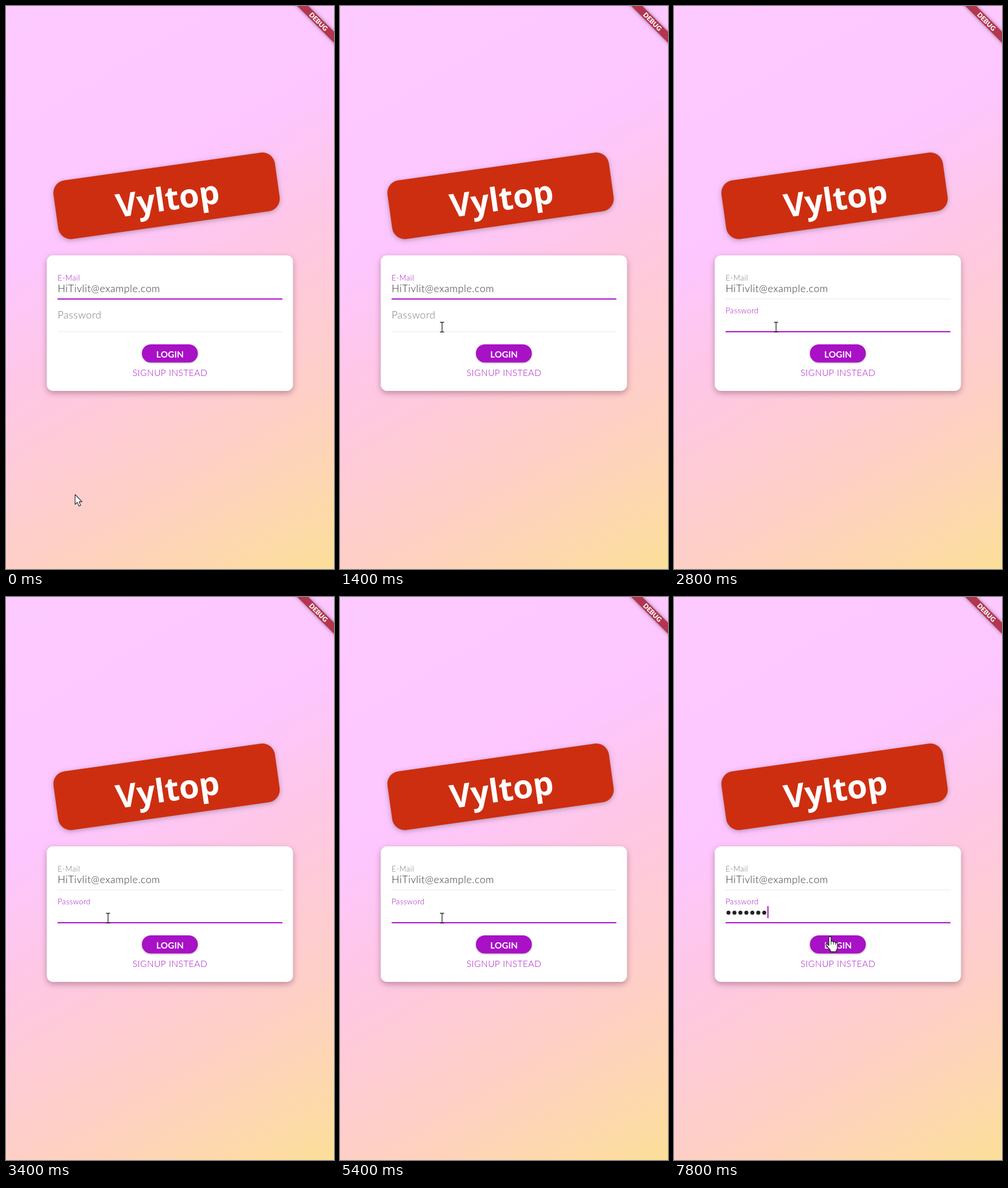
An HTML page with a canvas that plays this animation: 572 px wide and 980 px high, repeating every 8 s.

```html
<!DOCTYPE html>
<html lang="en">
<head>
<meta charset="utf-8">
<title>Login form</title>
<style>
  html, body { margin: 0; width: 100%; height: 100%; overflow: hidden; }
  canvas { display: block; width: 572px; height: 980px; }
</style>
</head>
<body>
<canvas id="stage" width="572" height="980"></canvas>
<script>
const ctx = document.getElementById('stage').getContext('2d');
const W = 572, H = 980, LOOP = 8000, STEP = 200;
const PURPLE = '#a811c5', GREY = '#777', INK = '#303030';
const EMAIL = 'HiTivlit@example.com', BRAND = 'Vyltop';
const FOCUS = 1850, BLINK = 500;
const KEYS = [5700, 5900, 6100, 6300, 6500, 6600, 6800];
// time, x, y of the pointer
const PATH = [[0, 120, 850], [800, 177, 688], [1400, 178, 559], [7000, 178, 559], [7800, 272, 592]];

function roundRect(x, y, w, h, r, fill) {
  ctx.beginPath();
  ctx.roundRect(x, y, w, h, r);
  ctx.fillStyle = fill;
  ctx.fill();
}

function withShadow(color, blur, dy, draw) {
  ctx.save();
  ctx.shadowColor = color;
  ctx.shadowBlur = blur;
  ctx.shadowOffsetY = dy;
  draw();
  ctx.restore();
}

function text(str, x, y, size, color, weight = 300, align = 'left') {
  ctx.font = `${weight} ${size}px Lato, sans-serif`;
  ctx.letterSpacing = weight < 400 ? `${size * 0.03}px` : '0px';
  ctx.textAlign = align;
  ctx.fillStyle = color;
  ctx.fillText(str, x, y);
  const width = ctx.measureText(str).width;
  ctx.letterSpacing = '0px';
  return width;
}

function background() {
  const g = ctx.createLinearGradient(0, 0, W, H);
  [[0, '#fdcaff'], [0.35, '#fdc6ff'], [0.5, '#fec7e8'], [0.75, '#fecfc6'], [0.9, '#fdd8ac'], [1, '#fbdf98']]
    .forEach(([at, color]) => g.addColorStop(at, color));
  ctx.fillStyle = g;
  ctx.fillRect(0, 0, W, H);
}

function ribbon() {
  ctx.save();
  ctx.translate(W, 0);
  ctx.rotate(Math.PI / 4);
  withShadow('rgba(0,0,0,.45)', 6, 0, () => {
    ctx.fillStyle = '#b4354f';
    ctx.fillRect(-60, 31.7, 120, 13.5);
  });
  text('DEBUG', 0, 42.6, 11.5, '#fff', 900, 'center');
  ctx.restore();
}

function sign() {
  ctx.save();
  ctx.translate(280, 330.4);
  ctx.rotate(-8 * Math.PI / 180);
  withShadow('rgba(0,0,0,.28)', 9, 2, () => roundRect(-195, -51.5, 390, 103, 22, '#cd2e10'));
  ctx.fillStyle = '#fff';
  ctx.textAlign = 'center';
  const font = size => {
    ctx.font = `900 ${size}px "Noto Sans", sans-serif`;
    ctx.fontStretch = 'extra-condensed';
  };
  font(70);
  font(Math.min(70, 70 * 182 / ctx.measureText(BRAND).width));
  ctx.fillText(BRAND, 1, 25.5);
  ctx.restore();
}

function underline(y, focused) {
  ctx.fillStyle = focused ? PURPLE : '#ebe9eb';
  ctx.fillRect(90, focused ? y - 1 : y - 0.5, 392, focused ? 2 : 1);
}

function caret(x, top, bottom) {
  ctx.fillStyle = PURPLE;
  ctx.fillRect(x - 1, top, 2, bottom - top);
}

function form(t) {
  withShadow('rgba(60,0,30,.32)', 11, 4, () => roundRect(71, 434, 429.5, 236, 11, '#fff'));
  const onPass = t >= FOCUS;
  const typed = KEYS.filter(k => t >= k);
  const since = typed.length ? typed[typed.length - 1] : FOCUS;
  const blinkOn = onPass
    ? Math.floor((t - since) / BLINK) % 2 === 0
    : Math.floor(t / BLINK) % 2 === 1;

  text('E-Mail', 90, 477.5, 13.3, onPass ? GREY : PURPLE);
  const width = text(EMAIL, 90, 497.5, 17.7, INK);
  underline(510, !onPass);
  if (!onPass && blinkOn) caret(90 + width + 1, 481, 502);

  const p = Math.min(1, Math.max(0, (t - FOCUS) / 200));
  text('Password', 90, 543.5 - 8.5 * p, 17.7 - 4.4 * p, onPass ? PURPLE : GREY);
  underline(567, onPass);
  typed.forEach((_, i) => {
    ctx.beginPath();
    ctx.arc(95 + 10.4 * i, 549.5, 3.5, 0, 2 * Math.PI);
    ctx.fillStyle = '#222';
    ctx.fill();
  });
  if (onPass && blinkOn) {
    const n = typed.length;
    caret(91 + 10.4 * n, n ? 538 : 540, n ? 559 : 556);
  }

  withShadow('rgba(0,0,0,.3)', 3, 1, () => roundRect(237, 589, 97.5, 31.5, 15.75, PURPLE));
  text('LOGIN', 286, 612, 15.5, '#fff', 700, 'center');
  text('SIGNUP INSTEAD', 286, 643.5, 15.5, PURPLE, 300, 'center');
}

function outlined(path, width) {
  const shape = new Path2D(path);
  ctx.lineJoin = 'round';
  ctx.lineWidth = width;
  ctx.fillStyle = '#fff';
  ctx.fill(shape);
  ctx.strokeStyle = '#222';
  ctx.stroke(shape);
}

const cursors = {
  arrow() {
    outlined('M.5 .5V17.5L4.4 13.9 7.2 20.5 10.2 19.2 7.4 12.9H12.6Z', 1.1);
  },
  beam() {
    ctx.strokeStyle = '#222';
    ctx.lineWidth = 1.3;
    ctx.stroke(new Path2D('M-3.5-8.5H-1L0-7.5 1-8.5H3.5M0-7.5V7.5M-3.5 8.5H-1L0 7.5 1 8.5H3.5'));
  },
  hand() {
    outlined('M-2 1Q-2-1 0-1T2 1V8Q2 6.5 4 7T6 9Q6 7.7 8 8.2T9.6 10.2Q10 9 11.6 9.8T13 12V18Q13 21 11 23V25.5H1V23.5L-4 17-7 13.5Q-8 11-5.5 11.5L-2 14.5Z', 1.3);
    ctx.lineWidth = 0.9;
    ctx.stroke(new Path2D('M2 8V13M6 9V13M9.6 10.2V13.5'));
  }
};

function pointer(t) {
  let i = PATH.findIndex(k => k[0] > t);
  if (i < 0) i = PATH.length - 1;
  const [t0, x0, y0] = PATH[i - 1], [t1, x1, y1] = PATH[i];
  const p = Math.min(1, (t - t0) / (t1 - t0));
  const x = x0 + (x1 - x0) * p, y = y0 + (y1 - y0) * p;
  const onButton = x > 237 && x < 335 && y > 589 && y < 621;
  const onField = x > 90 && x < 482 && y > 455 && y < 568;
  ctx.save();
  ctx.translate(x, y);
  cursors[onButton ? 'hand' : onField ? 'beam' : 'arrow']();
  ctx.restore();
}

function draw(t) {
  background();
  sign();
  form(t);
  ribbon();
  pointer(t);
}

const start = performance.now();
function tick() {
  const t = (performance.now() - start) % LOOP;
  draw(Math.floor(t / STEP) * STEP);
  requestAnimationFrame(tick);
}
tick();
</script>
</body>
</html>
```
